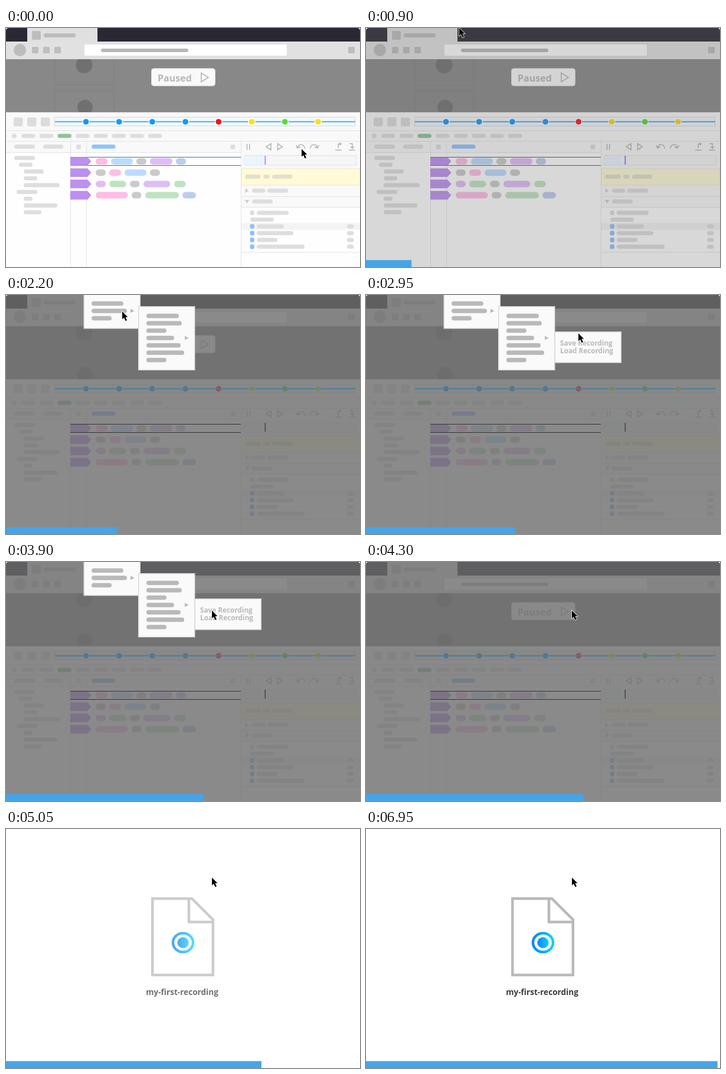
An HTML page that plays this animation: 600x406 px, repeating every 7 s.

```html
<!DOCTYPE html>
<html lang="en">
<head>
<meta charset="utf-8">
<title>Save a recording</title>
<style>
  html, body { margin: 0; width: 100%; height: 100%; overflow: hidden; background: #fff; }
  svg { display: block; width: 100vw; height: 100vh; }
  text { font-family: "Open Sans", "Noto Sans", sans-serif; font-weight: 700; }
</style>
</head>
<body>
<svg id="stage" viewBox="0 0 600 406">
  <defs>
    <linearGradient id="glow">
      <stop offset="0" stop-color="#0b86f2"/>
      <stop offset="1" stop-color="#12cdfc"/>
    </linearGradient>
    <clipPath id="rounded"><path d="M0 406V5Q0 0 5 0H595Q600 0 600 5V406Z"/></clipPath>
    <clipPath id="viewport"><rect y="53" width="600" height="90"/></clipPath>
  </defs>
  <g id="screen" clip-path="url(#rounded)">
    <g id="page"></g>
    <rect id="shade" width="600" height="406" fill="#6d6d6d"/>
    <g id="shadeLines" fill="none">
      <path d="M83 159.3H592" stroke="#3f80a5" stroke-width="1.8" opacity=".6"/>
      <path id="darkLines" d="M109 219.5H398M109 233.5H398M439.3 217V232" stroke="#333"/>
    </g>
  </g>
  <g id="menu1"></g>
  <g id="menu2"></g>
  <g id="menu3"></g>
  <g id="file">
    <path d="M248.3 118.2H315L350.8 154V248H248.3ZM310 118V158H351" fill="none" stroke="#b9b9b9" stroke-width="4.5"/>
    <ellipse cx="300" cy="193" rx="17" ry="16" fill="none" stroke="url(#glow)" stroke-width="4.4"/>
    <ellipse cx="300" cy="193" rx="9.7" ry="9.2" fill="url(#glow)"/>
    <text x="298.5" y="282" font-size="13.6" text-anchor="middle" fill="#3b3b3d">my-first-recording</text>
  </g>
  <rect id="progress" y="394.3" height="12" fill="#45a5e8"/>
  <path id="cursor" d="M0 0V13.2L3 10.4L5.5 16L8 15L5.5 9.5H9.4Z" stroke="#fff" stroke-width="1.4" paint-order="stroke"/>
</svg>
<script>
const LOOP = 7000;
const $ = id => document.getElementById(id);

// Markup helpers
const rect = (x, y, w, h, fill, rx = 0, extra = '') =>
  `<rect x="${x}" y="${y}" width="${w}" height="${h}" rx="${rx}" fill="${fill}" ${extra}/>`;
const pill = (x1, x2, cy, fill = '#dedede', h = 7) =>
  rect(x1, cy - h / 2, x2 - x1, h, fill, Math.min(h, x2 - x1) / 2);
const circle = (cx, cy, r, fill, extra = '') =>
  `<circle cx="${cx}" cy="${cy}" r="${r}" fill="${fill}" ${extra}/>`;
const shape = (d, fill) => `<path d="${d}" fill="${fill}"/>`;
const line = (d, stroke = '#e3e3e5', w = 1) =>
  `<path d="${d}" fill="none" stroke="${stroke}" stroke-width="${w}"/>`;
const label = (x, y, size, fill, s) =>
  `<text x="${x}" y="${y}" font-size="${size}" fill="${fill}">${s}</text>`;

function browser() {
  const gray = '#bdbdbd';
  return rect(0, 0, 600, 24, '#2a2834') + rect(36, 0, 119, 24, '#e0e0e0') +
    rect(44, 5, 15, 15, gray, 2) + pill(64, 118, 12.5, gray) +
    rect(0, 23, 600, 30, '#e1e1e1') + circle(23.5, 37.5, 10.5, gray) +
    [44, 63, 82, 580].map(x => rect(x, 32, 11, 11, gray, 1.5)).join('') +
    rect(133, 28, 343, 19, '#fff', 1) + pill(161, 309, 38, '#b9b9b9', 6) +
    rect(0, 53, 600, 90, '#888') +
    `<g clip-path="url(#viewport)">` +
    rect(82.5, 40, 100, 56.5, 'none', 1, 'stroke="#7e7e7e"') +
    rect(82.5, 106.5, 100, 60, 'none', 1, 'stroke="#7e7e7e"') +
    circle(132.5, 63, 14, '#707070') + circle(134, 135, 13, '#707070') + '</g>' +
    rect(246.5, 68.8, 108, 29.5, '#f9f9f9', 4, 'stroke="#dadada"') +
    label(257, 91, 16, '#b7b7b7', 'Paused') +
    line('M331 76.5L343 84L331 91.5Z', '#b7b7b7', 1.7);
}

function toolbars() {
  const dots = ['#0c9bff', '#0c9bff', '#0c9bff', '#0c9bff', '#fa0f1c', '#ffdd22', '#57de31', '#ffdd22'];
  let s = rect(0, 143, 600, 263, '#f9f9fa') +
    [13, 36, 59].map(x => rect(x, 152, 15.5, 15, '#dcdcdc', 2)).join('') +
    rect(82.5, 151.5, 509, 15, '#f1f8fd', 0, 'stroke="#d5dadd"') +
    line('M83 159.3H592', '#4cb0ef', 2) +
    dots.map((c, i) => circle(135.5 + i * 56.2, 159.3, 5.6, c, 'stroke="#fff" stroke-width="1.4"')).join('') +
    line('M0 174.5H600M0 192.5H600M0 143.5H600') + circle(14, 183.3, 4, '#dedede');
  for (let i = 0; i < 8; i++) {
    const x = 26 + i * 30.7;
    s += pill(x, x + 23.5, 183.3, i === 2 ? '#8fc594' : '#dedede');
  }
  return s + pill(14, 49, 201.5) + pill(63, 97, 201.5) + rect(119, 198, 8, 8, '#dedede', 2) +
    pill(145, 185.5, 201.5, '#8fc4fd') + rect(380.5, 198, 8, 8, '#dedede', 2);
}

function panels() {
  const tree = [[14, 49], [22, 45], [30, 64], [30, 53], [30, 91], [18, 53], [30, 45], [30, 87], [30, 60]];
  const [pink, blue, gray, lilac, navy, green] =
    ['#ffbce6', '#bcdcff', '#cacaca', '#dfbdf8', '#bccdee', '#bfe3c1'];
  const rows = [
    [[152, 172, pink], [178, 215, blue], [221, 238, gray], [244, 282, lilac], [288, 305, navy]],
    [[152, 169, gray], [175, 195, pink], [201, 238, blue], [244, 261, gray]],
    [[152, 169, lilac], [175, 203.5, green], [210, 226.5, gray], [233, 278.5, lilac], [285, 304.5, green]],
    [[152, 206.5, pink], [213, 229.5, gray], [236, 293, green], [299, 322, navy]]
  ];
  let s = rect(0, 212, 398, 194, '#fefefe') + line('M0 211.5H398M109.5 193V406M136.5 193V406M398.5 193V406') +
    tree.map(([a, b], i) => pill(a, b, 220.7 + i * 11.55)).join('') +
    line('M109 219.5H398M109 233.5H398', '#3575b0');
  rows.forEach((row, i) => {
    const y = 226.5 + i * 19.2;
    s += shape(`M109 ${y - 7.3}H138L144.5 ${y}L138 ${y + 7.3}H109Z`, '#bc8ff0') +
      row.map(([a, b, c]) => pill(a, b, y, c, 11)).join('');
  });
  return s;
}

function debuggerPane() {
  const bars = [[425, 479], [414, 454], [425, 471], [425, 487], [425, 460], [425, 506]];
  const icons = 'M408.5 197V207M412.8 197V207M449 196.5L441 201.7L449 207ZM460.5 196.5L468.5 201.7L460.5 207Z' +
    'M491.5 199L494 204L499 202M494 204C496 196 505 196 506.5 205' +
    'M530.5 199L528 204L523 202M528 204C526 196 517 196 515.5 205' +
    'M558 207.5H569M563 204.5V197H568M565.5 194.8L568 197L565.5 199.2' +
    'M581 207.5H592M582 196.5H587V204M584 201.5L587 204.5L590 201.5';
  let s = line(icons, '#b3b3b3', 1.5) +
    rect(404, 216.5, 190, 16.5, '#f6f6f8', 0, 'stroke="#e0e0e2"') + rect(404, 217, 35, 15.5, '#eaf6fe') +
    line('M439.3 217V232', '#bc8ff0', 2) +
    rect(399, 239, 201, 28, '#fffbd8', 0, 'stroke="#ebe7cc"') +
    [[405, 431.5], [436, 447], [451, 485.5]].map(([a, b]) => pill(a, b, 252.5, '#e4e0c8')).join('') +
    line('M399 286.5H600M399 304.5H600') +
    shape('M405.5 272.5L411.5 276.3L405.5 280Z', '#cecece') + pill(417, 439.5, 276.3) + pill(443, 478, 276.3) +
    shape('M404.5 292L412.5 292L408.5 298Z', '#cecece') + pill(417, 452, 294.8) +
    rect(399, 305, 201, 101, '#fefefe') + rect(399, 331, 201, 12, '#f4f4f4') + line('M399 381H600');
  bars.forEach(([a, b], i) => {
    const y = 314 + i * 11.5;
    s += pill(a, b, y);
    if (i !== 1) s += rect(413.5, y - 4, 7.5, 8, i ? '#8fc0f8' : '#dedede', 3);
    if (i > 1) s += pill(578, 589.5, y);
  });
  return s;
}

const panel = (x, y, w, h) => rect(x + .75, y + .75, w - 1.5, h - 1.5, '#fafafa', 0, 'stroke="#dcdcdc" stroke-width="1.5"');
const items = (x, y, ends) => ends.map((end, i) => pill(x, end, y + i * 12.5, '#b9b9b9', 7.6)).join('');
const arrow = (x, y) => shape(`M${x} ${y - 3.5}L${x + 6.5} ${y}L${x} ${y + 3.5}Z`, '#b9b9b9');

$('page').innerHTML = browser() + toolbars() + panels() + debuggerPane();
$('menu1').innerHTML = panel(131.5, -24, 96.5, 81.5) + items(145, 14.5, [199, 205, 179]) + arrow(211, 27);
$('menu2').innerHTML = panel(224, 19, 96.5, 109) +
  items(238, 35.5, [293, 298, 272, 285, 296, 302, 272]) + arrow(303, 73);
$('menu3').innerHTML = panel(319.5, 62, 113.5, 53.5) +
  label(329, 86, 11.75, '#b9b9b9', 'Save Recording') + label(329, 99, 11.75, '#b9b9b9', 'Load Recording');

// Timing helpers
const clamp = v => Math.min(1, Math.max(0, v));
const mix = (a, b, p) => a + (b - a) * p;
function bezier(x1, y1, x2, y2) {
  const at = (a, b, s) => 3 * (1 - s) * (1 - s) * s * a + 3 * (1 - s) * s * s * b + s * s * s;
  return x => {
    let lo = 0, hi = 1;
    for (let i = 0; i < 24; i++) {
      const mid = (lo + hi) / 2;
      if (at(x1, x2, mid) < x) lo = mid; else hi = mid;
    }
    return at(y1, y2, (lo + hi) / 2);
  };
}
const ease = bezier(.25, .1, .25, 1);
const easeInOut = bezier(.42, 0, .58, 1);
const span = (t, from, to, curve = ease) => curve(clamp((t - from) / (to - from)));

// Each stop: position held until start, reached at end
const moves = [
  { start: 140, end: 800, x: 158, y: 0 },
  { start: 1540, end: 1890, x: 197, y: 28 },
  { start: 2310, end: 2730, x: 360, y: 65 },
  { start: 3150, end: 3500, x: 349, y: 82.5 }
];
function cursorAt(t) {
  let x = 501, y = 205.5;
  for (const m of moves) {
    const p = span(t, m.start, m.end);
    x = mix(x, m.x, p);
    y = mix(y, m.y, p);
  }
  return [x, y];
}

function showMenu(id, t, start) {
  const p = span(t, start, start + 280);
  const out = span(t, 3990, 4270);
  $(id).setAttribute('opacity', p * (1 - out));
  $(id).setAttribute('transform', `translate(0 ${-20 * (1 - p)})`);
}

function draw(t) {
  const dim = span(t, 830, 1160);
  $('shade').setAttribute('opacity', .8 * dim);
  $('shadeLines').setAttribute('opacity', dim);
  $('darkLines').setAttribute('opacity', 1 - span(t, 4550, 4700));
  showMenu('menu1', t, 980);
  showMenu('menu2', t, 1750);
  showMenu('menu3', t, 2590);

  const scale = mix(1, .8, span(t, 4606, 4900));
  $('screen').setAttribute('transform', `translate(300 203) scale(${scale}) translate(-300 -203)`);
  $('screen').setAttribute('opacity', 1 - span(t, 4705, 4940, easeInOut));
  $('file').setAttribute('opacity', span(t, 4900, 5250));

  $('progress').setAttribute('width', 600 * t / LOOP);
  $('cursor').setAttribute('transform', `translate(${cursorAt(t)})`);
}

const began = performance.now();
function tick() {
  draw((performance.now() - began) % LOOP);
  requestAnimationFrame(tick);
}
draw(0);
requestAnimationFrame(tick);
</script>
</body>
</html>
```
